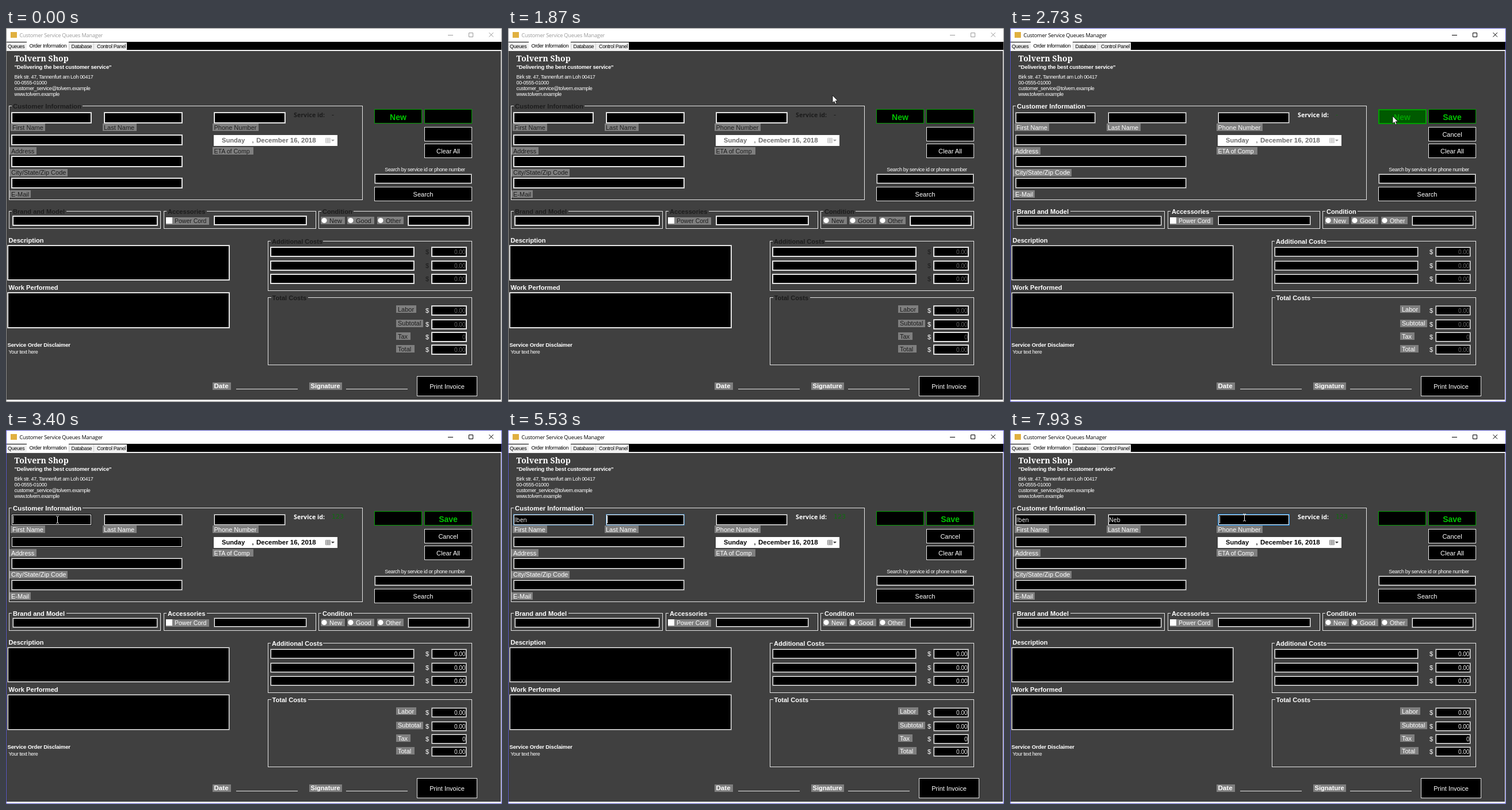
An HTML page that plays this animation: 862x650 px, repeating every 8 s.

```html
<!DOCTYPE html>
<html lang="en">
<head>
<meta charset="utf-8">
<title>Customer Service Queues Manager</title>
<style>
html, body { margin: 0; width: 100%; height: 100%; overflow: hidden; background: #404040; }
svg { display: block; width: 862px; height: 650px; }
text { white-space: pre; fill: #fff; font: 11px "Liberation Sans", Arial, sans-serif; }
rect, .line { shape-rendering: crispEdges; }
.line { fill: none; stroke: #e6e6e6; }
.b { font-weight: bold; }
.mid { text-anchor: middle; }
.end { text-anchor: end; }
.lab { fill: var(--lab); }
.small { font-size: 9px; letter-spacing: -.35px; }
.smallb { font-size: 9.6px; font-weight: bold; letter-spacing: -.2px; }
.ui { font-family: "Open Sans", "Noto Sans", sans-serif; font-size: 10.3px; }
.num { font-size: 10px; letter-spacing: -.1px; fill: var(--num); }
.dark { fill: #000; }
.green { fill: #00c400; font-weight: bold; font-size: 14px; }
.cap { fill: var(--cap); }
.date { fill: var(--date); font-weight: bold; }
.btn { fill: #000; stroke: #e6e6e6; }
.go { stroke: #00a000; }
</style>
</head>
<body>
<svg id="stage" viewBox="0 0 862 650" xmlns="http://www.w3.org/2000/svg"></svg>
<script>
const stage = document.getElementById('stage');
const LOOP = 8000;
const $ = id => document.getElementById(id);

// --- markup helpers ---
const rect = (x, y, w, h, fill, more = '') =>
  `<rect x="${x}" y="${y}" width="${w}" height="${h}" fill="${fill}" ${more}/>`;
const text = (x, y, str, cls = '', size = 0, more = '') =>
  `<text x="${x}" y="${y}" class="${cls}" ${size ? `style="font-size:${size}px"` : ''} ${more}>${str}</text>`;
const line = (d, more = '') => `<path class="line" d="${d}" ${more}/>`;
const box = (x, y, r, b, edge = 'var(--edge)', id = '') =>
  rect(x, y, r - x, b - y, edge, id && `id="${id}"`) +
  rect(x + 1, y + 1, r - x - 2, b - y - 2, '#fff') +
  rect(x + 2, y + 2, r - x - 4, b - y - 4, '#000');
const label = (x, y, r, str, tx, cls = 'lab', size = 11) =>
  rect(x, y, r - x, 13, '#7f7f7f') + text(tx, y + 10.5, str, cls, size);
const group = (x, y, r, b, str, tx, gap, size = 11.1) =>
  line(`M${tx - 2} ${y + .5}H${x + .5}V${b + .5}H${r + .5}V${y + .5}H${gap}`) +
  text(tx, y + 4.5, str, 'b lab', size);
const button = (x, y, r, b, str, id = '', cls = '') =>
  `<rect class="btn ${cls}" x="${x + .5}" y="${y + .5}" width="${r - x - 1}" height="${b - y - 1}" ${id && `id="${id}Btn"`}/>` +
  text((x + r) / 2, (y + b) / 2 + (cls ? 6.5 : 4.5), str, 'mid ' + (cls && 'green'), 0, id && `id="${id}"`);

function frame() {
  return rect(0, 0, 862, 650, '#fff') +
    rect(8, 7, 11, 10, '#e0b040') +
    text(23.5, 15.7, 'Customer Service Queues Manager', 'ui cap', 9.2, 'letter-spacing="-.2"') +
    `<path d="M768 12.5H777M804.5 8.5H811.5V15.5H804.5ZM839.5 8L847 15.5M847 8L839.5 15.5" fill="none" style="stroke:var(--cap)"/>` +
    rect(1, 24, 860, 15, '#000') +
    rect(1, 25, 209, 13, '#f0f0f0') + rect(36, 24, 73, 15, '#fff') +
    rect(109, 25, 1, 13, '#d0d0d0') + rect(152, 25, 1, 13, '#d0d0d0') +
    text(3, 35, 'Queues', 'small dark') + text(40.5, 33.7, 'Order Information', 'small dark') +
    text(113.5, 35, 'Database', 'small dark') + text(158, 35, 'Control Panel', 'small dark') +
    rect(0, 38, 861, 2, '#f4f4f4') + rect(1, 40, 859, 606, '#404040');
}

function header() {
  return text(14.5, 58, 'Tolvern Shop', '', 0, `style="font:600 14px 'Noto Serif',serif"`) +
    text(14.5, 70.7, '"Delivering the best customer service"', 'smallb') +
    ['Birk str. 47, Tannenfurt am Loh 00417', '00-0555-01000',
     'customer_service@tolvern.example', 'www.tolvern.example']
      .map((s, i) => text(14.5, 88 + i * 10.1, s, 'small')).join('');
}

function customer() {
  return group(5, 135, 619, 298, 'Customer Information', 12, 133, 11.4) +
    box(9, 146, 149, 166, '', 'first') + box(170, 146, 307, 166, '', 'last') +
    box(361, 146, 486, 166, '', 'phone') + box(9, 185, 307, 204, '', 'street') +
    box(9, 222, 307, 242) + box(9, 260, 307, 279) +
    label(8, 166, 68, 'First Name', 11) + label(168, 166, 227, 'Last Name', 170) +
    label(359, 166, 439, 'Phone Number', 361.5) +
    label(6, 207, 53, 'Address', 9) + label(359, 207, 430, 'ETA of Comp', 361.5, 'lab', 10.6) +
    label(6, 244.5, 107, 'City/State/Zip Code', 9) + label(6, 282, 43, 'E-Mail', 9) +
    text(500, 154.5, 'Service id:', 'ui b lab', 10.7) +
    text(566, 154, '-', '', 11, `id="sid" font-family="DejaVu Sans"`) +
    rect(361, 186, 215, 19, '#fff') +
    text(375, 199.3, 'Sunday', 'date', 11.1) + text(427.5, 199.3, ',', 'date') +
    text(435, 199.3, 'December 16, 2018', 'date', 11.5) +
    `<g id="cal"><path d="M555.5 191.5H563.5V199.5H555.5ZM555 193.5H563M555 195.5H563M555 197.5H563M558.5 192V199M561 192V199" fill="none" stroke="#777" stroke-width=".8"/>` +
    `<path d="M565 194H571L568 197Z" fill="#333"/></g>` +
    text(11.5, 160, '', 'ui', 0, 'id="firstText"') + text(172, 160, '', 'ui', 0, 'id="lastText"') +
    rect(12, 149, 1, 13, '#fff', 'id="caret"');
}

function actions() {
  return button(640, 141, 723, 166, 'New', 'new', 'go') + button(727, 141, 810, 166, 'Save', 'save', 'go') +
    button(727, 172, 810, 197, 'Cancel', 'cancel') + button(727, 201, 810, 226, 'Clear All') +
    text(728, 249.3, 'Search by service id or phone number', 'small mid') +
    box(640, 253, 810, 271, '#7a7a7a') + button(640, 276, 810, 301, 'Search') +
    button(714, 605, 819, 640, 'Print Invoice');
}

function details() {
  const radio = (x, r, cx, str, tx) => label(x, 328, r, str, tx, 'lab', str === 'Other' ? 10.6 : 11) +
    `<circle cx="${cx}" cy="334.5" r="4.6" fill="#fff"/>`;
  return group(5, 318, 268, 348, 'Brand and Model', 12, 105) + box(11, 326, 264, 344) +
    group(274, 318, 538, 348, 'Accessories', 281, 349) + box(361, 326, 523, 343) +
    label(278, 328.5, 353, 'Power Cord', 293, 'lab', 10.5) + rect(278, 329, 11, 11, '#fff') +
    group(543, 318, 809, 348, 'Condition', 550, 604) + box(698, 326, 806, 344) +
    radio(547, 589, 553, 'New', 562) + radio(593, 640, 599, 'Good', 608) + radio(645, 691, 651, 'Other', 660) +
    text(4.5, 373, 'Description', 'b', 11.1) + box(2, 377, 389, 439) +
    text(4.5, 455, 'Work Performed', 'b', 11.1) + box(2, 459, 389, 522) +
    text(2.5, 554, 'Service Order Disclaimer', 'smallb') + text(4.5, 566, 'Your text here', 'small');
}

function costs() {
  const sum = (y, str, cls) => text(729, y + 13.2, '$', cls) + box(739, y, 801, y + 18) +
    text(798.5, y + 12.8, str, 'ui num end');
  return group(455, 370, 809, 456, 'Additional Costs', 462, 551) +
    [380, 404, 427].map(y => box(459, y, 710, y + 18) + sum(y, '0.00', 'lab')).join('') +
    group(455, 468, 809, 585, 'Total Costs', 462.5, 525) +
    label(678, 482, 713, 'Labor', 681) + label(678, 506.5, 725, 'Subtotal', 681) +
    label(678, 529, 703, 'Tax', 681) + label(678, 551, 710, 'Total', 681) +
    [[482, '0.00'], [506, '0.00'], [528, '0'], [550, '0.00']].map(([y, s]) => sum(y, s, '')).join('') +
    label(359, 615.5, 391, 'Date', 361.5, 'b', 11.6) + label(527, 615.5, 584, 'Signature', 529.5, 'b', 11.1) +
    line('M400 627.5H507M591 627.5H698');
}

stage.innerHTML = frame() + header() + customer() + actions() + details() + costs() +
  `<rect id="rim" class="line" x=".5" y=".5" width="861" height="649"/>` +
  `<g id="arrow"><path d="M0 0V13.2L3 10.5L5 15.2L7.2 14.3L5.2 9.7H9.3Z" fill="#fff" stroke="#000" stroke-width=".8"/></g>` +
  `<g id="beam"><path d="M-2.5 -6H-.8L0 -5.2L.8 -6H2.5M0 -5.2V5.2M-2.5 6H-.8L0 5.2L.8 6H2.5" fill="none" stroke="#fff"/></g>`;

// --- motion: [time, values...] ---
const OFF = [204, 204, 204], IDLE = [122, 122, 122], OVER = [23, 23, 23], BLUE = [0, 120, 215];
const enable = [[0, ...OFF], [2600, ...OFF], [2700, ...IDLE]];
const edges = {
  first: [...enable, [3330, ...IDLE], [3390, ...OVER], [3450, ...OVER], [3600, ...BLUE], [5390, ...BLUE],
    [5670, ...IDLE], [7120, ...IDLE], [7130, ...OVER], [7270, ...OVER], [7500, ...IDLE]],
  last: [...enable, [5390, ...IDLE], [5670, ...BLUE], [7750, ...BLUE], [7930, ...IDLE]],
  phone: [...enable, [7520, ...IDLE], [7580, ...OVER], [7750, ...OVER], [7900, ...BLUE]],
  street: [...enable, [3200, ...IDLE], [3270, ...OVER], [3400, ...OVER], [3600, ...IDLE]]
};
const pointer = [
  [400, 70, 9], [600, 190, 60], [800, 320, 110], [970, 210, 169], [1110, 46, 160], [1200, 66, 150],
  [1680, 66, 150], [1870, 564, 117], [2330, 665, 153], [2860, 665, 153], [3060, 510, 182],
  [3270, 295, 195], [3400, 89, 156], [7140, 89, 156], [7350, 180, 149], [7700, 407, 152]
];
const fields = [[9, 146, 149, 166], [170, 146, 307, 166], [361, 146, 486, 166], [9, 185, 307, 204]];
const typed = { first: ['Iben', [4400, 4600, 4870, 5070]], last: ['Neb', [6070, 6270, 6400]] };

function at(track, t) {
  let i = 0;
  while (i < track.length - 1 && track[i + 1][0] <= t) i++;
  const a = track[i], b = track[i + 1] || a;
  const k = b === a ? 0 : Math.max(0, (t - a[0]) / (b[0] - a[0]));
  const s = k * k * (3 - 2 * k);
  return a.slice(1).map((v, j) => v + (b[j + 1] - v) * s);
}
const rgb = c => `rgb(${c.map(Math.round)})`;
const show = (id, on) => $(id).setAttribute('visibility', on ? 'visible' : 'hidden');
const within = (t, a, b) => t >= a && t < b;

function draw(t) {
  const active = t >= 2600, opened = t >= 2670, ready = t >= 2800;
  const vars = {
    lab: opened ? '#fff' : '#1c1c1c', edge: rgb(at(enable, t)), cap: active ? '#000' : '#999',
    num: ready ? '#fff' : '#6d6d6d', date: ready ? '#000' : '#6d6d6d'
  };
  for (const k in vars) stage.style.setProperty('--' + k, vars[k]);
  for (const k in edges) $(k).setAttribute('fill', rgb(at(edges[k], t)));
  $('rim').style.stroke = active ? '#5656c4' : '#8a8a8a';
  $('cal').setAttribute('opacity', ready ? 1 : .5);

  const hover = within(t, 2200, 2800);
  $('newBtn').style.fill = hover ? '#005a00' : '#000';
  $('newBtn').style.strokeWidth = hover ? 2 : 1;
  $('new').style.fill = hover ? '#00a000' : '#00c400';
  show('new', !ready);
  show('save', opened);
  show('cancel', opened);
  $('sid').textContent = ready ? '123' : '-';
  $('sid').style.fill = opened ? '#0c700c' : '#111';
  $('sid').style.fontFamily = '"DejaVu Sans", sans-serif';

  for (const k in typed) {
    const [word, times] = typed[k];
    $(k + 'Text').textContent = word.slice(0, times.filter(x => x <= t).length);
  }
  const spot = t < 5400 ? 11.5 + $('firstText').getComputedTextLength()
    : t < 7770 ? 172 + $('lastText').getComputedTextLength() : 364;
  $('caret').setAttribute('x', Math.round(spot));
  show('caret', t >= 3390 && !within(t, 4070, 4400) && !within(t, 6930, 7530));

  const [x, y] = at(pointer, t);
  const seen = within(t, 400, 4400) || t >= 7130;
  const inField = ready && fields.some(([l, u, r, b]) => x >= l && x < r && y >= u && y < b);
  show('arrow', seen && !inField);
  show('beam', seen && inField);
  $('arrow').setAttribute('transform', `translate(${x} ${y})`);
  $('beam').setAttribute('transform', `translate(${Math.round(x) + .5} ${Math.round(y)})`);
}

const start = performance.now();
function tick() {
  draw((performance.now() - start) % LOOP);
  requestAnimationFrame(tick);
}
tick();
</script>
</body>
</html>
```
